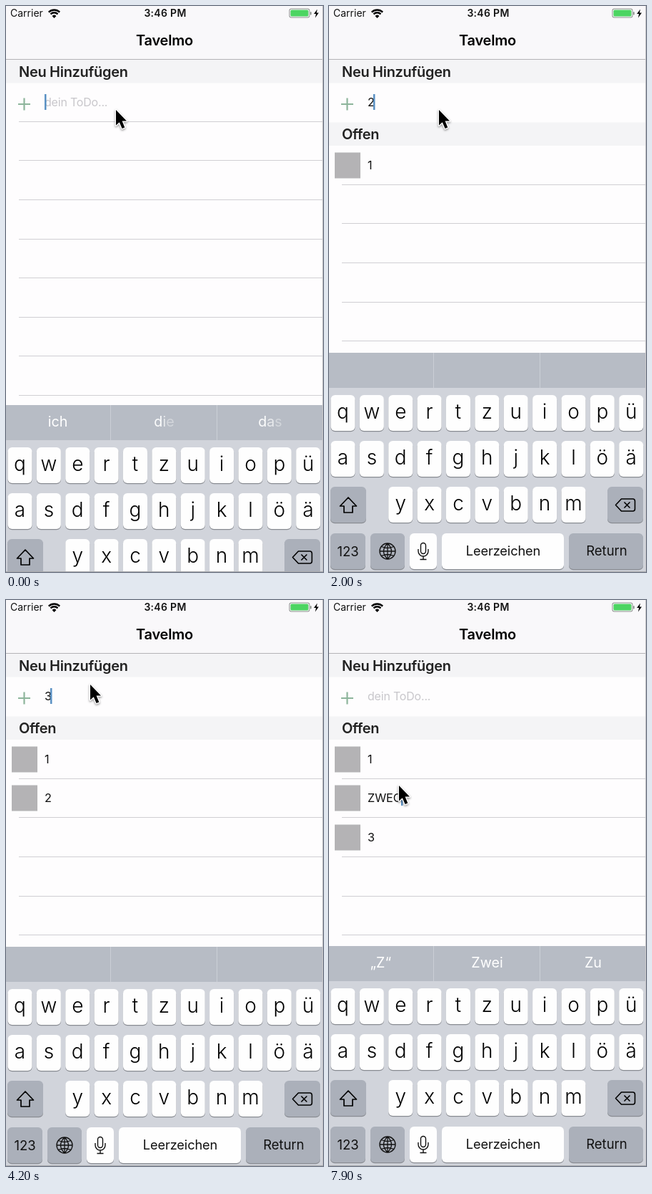
These frames come from a looping animation (444 px wide and 790 px high, 8000 ms). An HTML page with a canvas:

```html
<!DOCTYPE html>
<html lang="de">
<head>
<meta charset="utf-8">
<style>
  html, body { margin: 0; width: 444px; height: 790px; overflow: hidden; background: #fefdfe; }
  canvas { display: block; }
</style>
</head>
<body>
<canvas width="444" height="790"></canvas>
<script>
const W = 444, H = 790, LOOP = 8000, ROW = 54.6, KB = 307;
const ctx = document.querySelector('canvas').getContext('2d');

// Keyboard visits: [shown, dismissed]
const visits = [[-196, 460], [1400, 2230], [3600, 4550], [6545, 9999]];
// Text in the entry field: [time, text, focused]
const entry = [[0, '', 1], [300, '1', 1], [500, '', 0], [1400, '', 1], [2000, '2', 1],
  [2300, '', 0], [3600, '', 1], [4100, '3', 1], [4600, '', 0]];
const edits = [[0, '2', 0], [6500, '2', 1], [7000, '', 1], [7200, 'Z', 1],
  [7400, 'ZW', 1], [7600, 'ZWE', 1], [7800, 'ZWEO', 1]];
const counts = [[0, 0], [500, 1], [2300, 2], [4600, 3]];
const pointer = [[0, 154, 145], [2300, 154, 145], [2700, 121, 165], [2900, 121, 165],
  [3300, 118, 118], [4700, 118, 118], [5300, 94, 255], [5600, 94, 255], [6100, 98, 259], [8000, 98, 259]];

const clamp = v => Math.max(0, Math.min(1, v));
const latest = (list, t) => list.findLast(e => e[0] <= t);

// Share of the way left for a critically damped spring
const spring = ms => (1 + ms * .014) * Math.exp(-ms * .014);

function keyboardTop(t) {
  const [start, end] = latest(visits, t);
  const shown = t < end ? 1 - spring(t - start) : spring(t - end);
  return Math.round(H - KB * shown);
}

function pointerAt(t) {
  const i = pointer.findLastIndex(p => p[0] <= t);
  const [t0, x0, y0] = pointer[i], [t1, x1, y1] = pointer[i + 1];
  const u = (t - t0) / (t1 - t0), k = u * u * (3 - 2 * u);
  return [x0 + (x1 - x0) * k, y0 + (y1 - y0) * k];
}

function rect(x, y, w, h, color) {
  ctx.fillStyle = color;
  ctx.fillRect(x, y, w, h);
}

function round(x, y, w, h, r, color) {
  ctx.fillStyle = color;
  ctx.beginPath();
  ctx.roundRect(x, y, w, h, r);
  ctx.fill();
}

function text(s, x, y, size, { weight = 400, color = '#111', align = 'left', gap = 0 } = {}) {
  ctx.font = `${weight} ${size}px Inter, "Open Sans", sans-serif`;
  ctx.letterSpacing = gap + 'px';
  ctx.textAlign = align;
  ctx.fillStyle = color;
  ctx.fillText(s, x, y);
  return ctx.measureText(s).width;
}

function path(d, { x = 0, y = 0, fill, stroke, width = 1.6 }) {
  const p = new Path2D(d);
  ctx.save();
  ctx.translate(x, y);
  ctx.lineWidth = width;
  ctx.lineJoin = 'round';
  if (stroke) { ctx.strokeStyle = stroke; ctx.stroke(p); }
  if (fill) { ctx.fillStyle = fill; ctx.fill(p); }
  ctx.restore();
}

function editable(s, focused, y) {
  const w = s ? text(s, 54, y + 6, 16.3, { gap: -.1 }) : 0;
  if (focused) rect(Math.floor(54 + w - (s ? 1 : 0)), y - 11, 2.5, 22, '#5a91c4');
}

function statusBar() {
  rect(0, 0, W, 74, '#f9f8fa');
  rect(0, 74, W, 1, '#b5b4b7');
  text('Carrier', 6, 15, 14);
  text('3:46 PM', 223, 15, 14, { weight: 600, align: 'center', gap: .3 });
  text('Tavelmo', 222, 55, 20, { weight: 600, color: '#000', align: 'center', gap: -.2 });
  path('M59.8 8.6A11 11 0 0 1 75.2 8.6M62.5 11.4A7 7 0 0 1 72.5 11.4', { stroke: '#000', width: 2.4 });
  path('M67.5 17L64.6 14A4.1 4.1 0 0 1 70.4 14Z', { fill: '#000' });
  round(396.5, 3.5, 29, 13, 3, '#8d928e');
  round(397.5, 4.5, 27, 11, 2, '#f9f8fa');
  round(398.5, 5.5, 25, 9, 1.5, '#4cd562');
  round(426, 8, 1.8, 4.5, 1, '#8d928e');
  path('M436 4.5L431.2 11H434.2L433 16.5L438 9.4H435Z', { fill: '#000' });
}

function heading(s, y) {
  rect(0, y, W, 32.5, '#f4f4f6');
  text(s, 18, y + 23.5, 20, { weight: 600, color: '#222', gap: -.3 });
}

function list(t) {
  const n = latest(counts, t)[1];
  heading('Neu Hinzufügen', 75);
  path('M17 137H34M25.5 128.5V145.5', { stroke: '#8db59b', width: 2.2 });
  const [, s, focused] = latest(entry, t);
  if (!s) text('dein ToDo...', 54, 140, 16, { color: '#c8c7cb', gap: -.2 });
  editable(s, focused, 134);

  const first = n ? 249 : 161;
  for (let y = first; y < H; y += ROW) rect(18, Math.round(y - .2), W - 18, 1, '#d0cfd3');
  if (!n) return;
  heading('Offen', 162.5);
  for (let i = 0; i < n; i++) {
    const y = Math.floor(222 + i * ROW);
    rect(8, y - 17.5, 36, 36, '#b4b3b5');
    const [, label, active] = i == 1 ? latest(edits, t) : [0, String(i + 1), 0];
    editable(label, active, y);
  }
}

function key(x, y, w, dark) {
  round(x, y + 1.3, w, 50, 6, '#898c92');
  round(x, y, w, 50, 6, dark ? '#abb0ba' : '#fefefe');
}

function suggestions(t, top) {
  rect(0, top, W, 49, '#b7bcc5');
  for (const x of [146, 295]) rect(x, top, 1, 49, '#cbcfd6');
  const content = t < 6500 ? latest(entry, t)[1] : latest(edits, t)[1];
  if (/\d/.test(content)) return;
  const words = content ? ['„Z“', 'Zwei', 'Zu'] : ['ich', 'die', 'das'];
  words.forEach((word, k) => {
    const style = { align: 'center', color: '#fff' };
    const x = [72.5, 221.5, 370][k];
    if (t >= 100) return text(word, x, top + 30, 19.7, style);
    // letters fade in one after the other
    ctx.font = '400 19.7px Inter, "Open Sans", sans-serif';
    ctx.letterSpacing = '0px';
    let left = x - ctx.measureText(word).width / 2;
    [...word].forEach((c, i) => {
      ctx.globalAlpha = k ? clamp(.95 - i * .28) : 1;
      left += text(c, left, top + 30, 19.7, { color: '#fff' });
    });
    ctx.globalAlpha = 1;
  });
}

function keyboard(t) {
  const top = keyboardTop(t);
  if (top >= H) return;
  rect(0, top, W, H - top, '#d1d4db');
  suggestions(t, top);
  ['qwertzuiopü', 'asdfghjklöä', 'yxcvbnm'].forEach((row, r) => {
    const y = top + 59 + Math.round(r * 64.2);
    [...row].forEach((c, i) => {
      const x = 19.5 + 40.37 * (i + (r == 2 ? 2 : 0));
      key(x - 17, y, 34);
      text(c, x, y + 33, 28, { weight: 350, color: '#000', align: 'center' });
    });
  });

  const y3 = top + 187, y4 = top + 252;
  key(2, y3, 50, true);
  path('M0 -11L11.5 1H6V10H-6V1H-11.5Z', { x: 27, y: y3 + 26, stroke: '#000', width: 1.7 });
  key(390, y3, 50, true);
  path('M-14 0L-6 -8.5H10Q13 -8.5 13 -5.5V5.5Q13 8.5 10 8.5H-6ZM-2 -4L6 4M6 -4L-2 4',
    { x: 415.5, y: y3 + 25.5, stroke: '#000' });

  key(2, y4, 49, true);
  key(58, y4, 48, true);
  key(113, y4, 38);
  key(158, y4, 171);
  key(336, y4, 104, true);
  const label = { color: '#111', align: 'center' };
  text('123', 26.5, y4 + 32, 18.5, label);
  text('Leerzeichen', 244, y4 + 31, 18.2, { ...label, gap: -.1 });
  text('Return', 389, y4 + 31, 18.5, label);
  path('M-11 0A11 11 0 1 1 11 0A11 11 0 1 1 -11 0M0 -11V11M-11 0H11M0 -11Q-11 0 0 11Q11 0 0 -11M-8.5 -6.5Q0 -2.5 8.5 -6.5M-8.5 6.5Q0 2.5 8.5 6.5',
    { x: 82, y: y4 + 25, stroke: '#111', width: 1.3 });
  path('M-3.5 -8A3.5 3.5 0 0 1 3.5 -8V0A3.5 3.5 0 0 1 -3.5 0ZM-7 -3V0A7 7 0 0 0 7 0V-3M0 7V11M-4.5 11.5H4.5',
    { x: 132, y: y4 + 25, stroke: '#111', width: 1.4 });
}

function arrow(t) {
  const [x, y] = pointerAt(t);
  const shape = 'M0 0V21.5L4.8 17.2L8.6 26L12.3 24.4L8.6 15.6H15Z';
  ctx.save();
  ctx.shadowColor = 'rgba(0,0,0,.4)';
  ctx.shadowBlur = 3;
  ctx.shadowOffsetY = 1.5;
  path(shape, { x, y, stroke: '#fff', width: 2.8 });
  ctx.restore();
  path(shape, { x, y, fill: '#000' });
}

function draw(now) {
  const t = Math.floor(now % LOOP / 100) * 100;
  rect(0, 0, W, H, '#fefdfe');
  statusBar();
  list(t);
  keyboard(t);
  rect(W - 1, 0, 1, H, '#c9c8cb');
  rect(0, H - 1, W, 1, '#aaabae');
  arrow(t);
}

let start;
function tick(now) {
  start ??= now;
  draw(now - start);
  requestAnimationFrame(tick);
}
requestAnimationFrame(tick);
</script>
</body>
</html>
```
